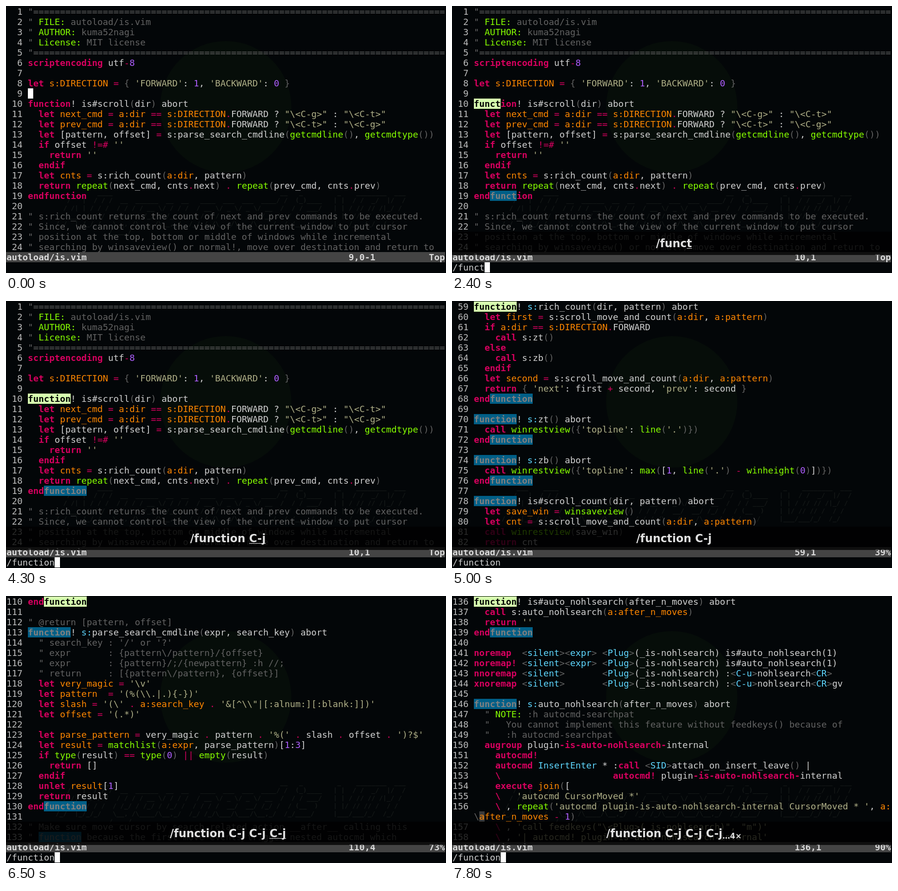
An HTML page that plays this animation: 905 px wide and 548 px high, repeating every 8 s.

```html
<!DOCTYPE html>
<html lang="en">
<head>
<meta charset="utf-8">
<title>Incremental search in a terminal editor</title>
<style>
html, body { margin: 0; width: 100%; height: 100%; overflow: hidden; background: #030608; }
#stage { position: absolute; left: 0; top: 0; width: 905px; height: 548px; overflow: hidden; }
#stage > * { position: absolute; margin: 0; }
.mono { left: 1px; font: 18.271px/21px "DejaVu Sans Mono", monospace; color: #d0d0d0; white-space: pre; }
.mono div { height: 21px; }
#disc { left: 317px; top: 72px; width: 270px; height: 270px; border-radius: 50%; background: #060d09; }
#art { left: 102px; top: 375px; font: bold 13px/16px "DejaVu Sans Mono", monospace; color: #151918; }
#text { top: 1px; }
#bar { left: 0; top: 505px; width: 903px; height: 21px; background: #444; }
#status { top: 505px; font-weight: bold; color: #dadada; }
#cmd { top: 526px; }
#caret { width: 11px; height: 21px; background: #fff; }
#panel { left: 0; top: 463px; width: 905px; height: 48px; background: rgba(0, 0, 0, .78); }
#keys { left: 6px; width: 901px; top: 11px; position: absolute; text-align: center; white-space: pre;
  font: bold 22.5px/26px "DejaVu Sans", sans-serif; color: #e0e0e0; }
#keys u { text-decoration: underline 1px; text-underline-offset: 2px; text-decoration-skip-ink: none; }
#keys small { font-size: 15.6px; line-height: 0; position: relative; top: 3px; }
.k { color: #d7005f; font-weight: bold; }
.r { color: #d7005f; }
.o { color: #ff8700; }
.g { color: #87ff00; }
.s { color: #afaf87; }
.n { color: #af5fff; }
.c { color: #5fd7ff; }
.d, .m { color: #626262; }
.l { color: #bcbcbc; }
.w { color: #ff8700; background: #3a3a3a; }
.hit { color: #808080; background: #005f87; }
.cur { color: #000; background: #d7ffaf; }
.hit, .cur, .w { display: inline-block; height: 21px; vertical-align: top; }
</style>
</head>
<body>
<div id="stage">
<div id="disc"></div>
<pre id="art">
    ___    ____                                            __   _         _    ________  ___
   /   |  / / /  __  ______  __  __   ____  ___  ___  ____/ /  (_)____   | |  / /  _/  |/  /
  / /| | / / /  / / / / __ \/ / / /  / __ \/ _ \/ _ \/ __  /  / / ___/   | | / // // /|_/ /
 / ___ |/ / /  / /_/ / /_/ / /_/ /  / / / /  __/  __/ /_/ /  / (__  )    | |/ // // /  / /
/_/  |_/_/_/   \__, /\____/\__,_/  /_/ /_/\___/\___/\__,_/  /_/____/     |___/___/_/  /_/
              /____/
</pre>
<div id="text" class="mono"></div>
<div id="bar"></div>
<div id="status" class="mono"></div>
<div id="cmd" class="mono"></div>
<div id="caret"></div>
<div id="panel"><div id="keys"></div></div>
</div>
<script>
const file = [];
const put = (start, text) => text.split('\n').forEach((line, i) => file[start + i] = line);
const rule = '"' + '='.repeat(77);

put(1, String.raw`${rule}
" FILE: autoload/is.vim
" AUTHOR: kuma52nagi
" License: MIT license
${rule}
scriptencoding utf-8

let s:DIRECTION = { 'FORWARD': 1, 'BACKWARD': 0 }

function! is#scroll(dir) abort
  let next_cmd = a:dir == s:DIRECTION.FORWARD ? "\<C-g>" : "\<C-t>"
  let prev_cmd = a:dir == s:DIRECTION.FORWARD ? "\<C-t>" : "\<C-g>"
  let [pattern, offset] = s:parse_search_cmdline(getcmdline(), getcmdtype())
  if offset !=# ''
    return ''
  endif
  let cnts = s:rich_count(a:dir, pattern)
  return repeat(next_cmd, cnts.next) . repeat(prev_cmd, cnts.prev)
endfunction

" s:rich_count returns the count of next and prev commands to be executed.
" Since, we cannot control the view of the current window to put cursor
" position at the top, bottom or middle of windows while incremental
" searching by winsaveview() or normal!, move over destination and return to`);

put(59, String.raw`function! s:rich_count(dir, pattern) abort
  let first = s:scroll_move_and_count(a:dir, a:pattern)
  if a:dir == s:DIRECTION.FORWARD
    call s:zt()
  else
    call s:zb()
  endif
  let second = s:scroll_move_and_count(a:dir, a:pattern)
  return { 'next': first + second, 'prev': second }
endfunction

function! s:zt() abort
  call winrestview({'topline': line('.')})
endfunction

function! s:zb() abort
  call winrestview({'topline': max([1, line('.') - winheight(0)])})
endfunction

function! is#scroll_count(dir, pattern) abort
  let save_win = winsaveview()
  let cnt = s:scroll_move_and_count(a:dir, a:pattern)
  call winrestview(save_win)
  return cnt
endfunction

function! s:scroll_move_and_count(dir, pattern) abort
  let cnt = 0
  let flag = a:dir == s:DIRECTION.FORWARD ? 'W' : 'bW'
  let edge = a:dir == s:DIRECTION.FORWARD ? line('w$') : line('w0')
  while 1
    let lnum = search(a:pattern, flag)
    if lnum == 0 || lnum == edge
      break
    endif
    let cnt += 1
  endwhile
  return cnt
endfunction`);

put(110, String.raw`endfunction

" @return [pattern, offset]
function! s:parse_search_cmdline(expr, search_key) abort
  " search_key : '/' or '?'
  " expr       : {pattern\/pattern}/{offset}
  " expr       : {pattern}/;/{newpattern} :h //;
  " return     : [{pattern\/pattern}, {offset}]
  let very_magic = '\v'
  let pattern  = '(%(\\.|.){-})'
  let slash = '(\' . a:search_key . '&[^\\"|[:alnum:][:blank:]])'
  let offset = '(.*)'

  let parse_pattern = very_magic . pattern . '%(' . slash . offset . ')?$'
  let result = matchlist(a:expr, parse_pattern)[1:3]
  if type(result) == type(0) || empty(result)
    return []
  endif
  unlet result[1]
  return result
endfunction

" Make sure move cursor by search related action __after__ calling this
" function because the first move events trigger nested autocmd which`);

put(136, String.raw`function! is#auto_nohlsearch(after_n_moves) abort
  call s:auto_nohlsearch(a:after_n_moves)
  return ''
endfunction

noremap  <silent><expr> <Plug>(_is-nohlsearch) is#auto_nohlsearch(1)
noremap! <silent><expr> <Plug>(_is-nohlsearch) is#auto_nohlsearch(1)
nnoremap <silent>       <Plug>(_is-nohlsearch) :<C-u>nohlsearch<CR>
xnoremap <silent>       <Plug>(_is-nohlsearch) :<C-u>nohlsearch<CR>gv

function! s:auto_nohlsearch(after_n_moves) abort
  " NOTE: :h autocmd-searchpat
  "   You cannot implement this feature without feedkeys() because of
  "   :h autocmd-searchpat
  augroup plugin-is-auto-nohlsearch-internal
    autocmd!
    autocmd InsertEnter * :call <SID>attach_on_insert_leave() |
    \                     autocmd! plugin-is-auto-nohlsearch-internal
    execute join([
    \   'autocmd CursorMoved *'
    \ , repeat('autocmd plugin-is-auto-nohlsearch-internal CursorMoved * ', a:after_n_moves - 1)
    \ , 'call feedkeys("\<Plug>(_is-nohlsearch)", "m")'
    \ , '| autocmd! plugin-is-auto-nohlsearch-internal'`);

// Syntax colouring: each grammar is a list of named groups, first match wins.
const grammar = parts => new RegExp(
  Object.entries(parts).map(([name, rx]) => `(?<${name}>${rx.source})`).join('|'), 'g');
const notes = grammar({ g: /\b(?:FILE|AUTHOR|License|NOTE):/ });
const maps = grammar({ k: /^\w+!?/, c: /[\w-]+(?=>)/, d: /[<>]/ });
const code = grammar({
  s: /'[^']*'|"[^"]*"/,
  c: /(?<=function! )s:|InsertEnter|SID/,
  k: /\b(?:scriptencoding|let|unlet|function|endfunction|if|else|endif|while|endwhile|break|return|call|augroup|autocmd!?|execute)(?!\w)|-is-auto-nohlsearch-|\\/,
  o: /(?<=let )[\w:]+|\ba:\w*|s:DIRECTION|(?<=execute )join/,
  g: /\b(?:getcmdline|getcmdtype|repeat|winrestview|winsaveview|line|max|winheight|matchlist|type|empty|search)(?=\()/,
  n: /\b\d+\b/,
  r: /!=#|==|\+=|\|\||[-=+.]/,
  d: /[(){}<>]/
});

function colour(line) {
  const note = /^\s*"/.test(line);
  const rx = note ? notes : /noremap/.test(line) ? maps : code;
  const cells = [...line].map(ch => ({ ch, cls: note ? 'm' : '' }));
  for (const m of line.matchAll(rx)) {
    const cls = Object.keys(m.groups).find(name => m.groups[name] !== undefined);
    for (let i = 0; i < m[0].length; i++) cells[m.index + i].cls = cls;
  }
  return cells;
}

const esc = s => s.replace(/&/g, '&amp;').replace(/</g, '&lt;').replace(/>/g, '&gt;');

function toHtml(cells) {
  let html = '', i = 0;
  while (i < cells.length) {
    const cls = cells[i].cls;
    let run = '';
    while (i < cells.length && cells[i].cls === cls) run += cells[i++].ch;
    html += cls ? `<span class="${cls}">${esc(run)}</span>` : esc(run);
  }
  return `<div>${html}</div>`;
}

const COLS = 78, ROWS = 24;

function page(view, pattern) {
  const rows = [];
  for (let num = view.top; rows.length < ROWS; num++) {
    const line = file[num] || '';
    let cells = colour(line);
    if (pattern) {
      [...line.matchAll(new RegExp(pattern, 'gi'))].forEach((m, n) => {
        const mark = num === view.line && n === 0 ? ' cur' : ' hit';
        for (let i = 0; i < pattern.length; i++) cells[m.index + i].cls += mark;
      });
    }
    let lead = [{ ch: String(num).padStart(3) + ' ', cls: 'l' }];
    do {
      rows.push(toHtml(lead.concat(cells.slice(0, COLS))));
      cells = cells.slice(COLS);
      lead = [{ ch: '    ', cls: '' }, { ch: '\\', cls: 'd' }];
      if (cells.length) cells[0].cls = 'w';
    } while (cells.length);
  }
  return rows.slice(0, ROWS).join('');
}

const view = (top, line, pos, part) => ({ top, line, pos, part });
const views = [
  view(1, 10, '10,1', 'Top'), view(59, 59, '59,1', '39%'), view(74, 74, '74,1', '49%'),
  view(110, 110, '110,4', '73%'), view(136, 136, '136,1', '90%')
];

const word = '/function', jump = ' C-j';
const cool = { hot: 0 }, on = { on: 1 }, off = { on: 0 };
const press = keys => ({ keys, hot: 1 });
const type = n => ({ cmd: word.slice(0, n), ...press(word.slice(0, n)) });

const steps = [
  [0, { view: 0, cmd: '', keys: '', hot: 0, on: 1 }],
  [100, off], [700, on],
  [800, type(1)], [1000, cool],
  [1200, type(2)], [1400, cool],
  [1500, type(3)], [1700, cool],
  [1900, { cmd: word.slice(0, 4) }], [2000, press(word.slice(0, 4))],
  [2100, { cmd: word.slice(0, 5) }], [2200, press(word.slice(0, 5))],
  [2400, type(6)], [2600, cool],
  [2700, type(7)], [2900, type(8)], [3100, cool],
  [3300, type(9)], [3500, cool],
  [3900, off], [4000, on],
  [4300, press(word + jump)], [4400, { view: 1 }], [4500, cool],
  [5000, off],
  [5400, { view: 2, on: 1, ...press(word + jump.repeat(2)) }], [5600, cool],
  [6000, off],
  [6500, { view: 3, on: 1, ...press(word + jump.repeat(3)) }], [6700, cool],
  [7100, off],
  [7600, { on: 1, ...press(word + jump.repeat(3) + '…4×') }], [7700, { view: 4 }], [7800, cool]
];

const LOOP = 8000;
const el = id => document.getElementById(id);
const [text, status, cmd, caret, panel, keys] =
  ['text', 'status', 'cmd', 'caret', 'panel', 'keys'].map(el);

function draw(s) {
  const v = views[s.view], pattern = s.cmd.slice(1);
  text.innerHTML = page(v, pattern);
  status.textContent = 'autoload/is.vim'.padEnd(64) + (pattern ? v.pos : '9,0-1').padEnd(15) + v.part;
  cmd.textContent = s.cmd;
  caret.style.left = (s.cmd ? 1 + 11 * s.cmd.length : 45) + 'px';
  caret.style.top = (s.cmd ? 526 : 169) + 'px';
  caret.style.visibility = s.on ? 'visible' : 'hidden';
  panel.style.visibility = s.keys ? 'visible' : 'hidden';
  keys.innerHTML = s.keys
    .replace(/(…4×|C-j|.)$/, s.hot ? '<u>$1</u>' : '$1')
    .replace('…4×', '<small>…4×</small>');
}

let shown = -1;
const begin = performance.now();

function tick() {
  const t = (performance.now() - begin) % LOOP;
  const past = steps.filter(([at]) => at <= t);
  if (past.length !== shown) {
    shown = past.length;
    draw(Object.assign({}, ...past.map(step => step[1])));
  }
  requestAnimationFrame(tick);
}
tick();
</script>
</body>
</html>
```
